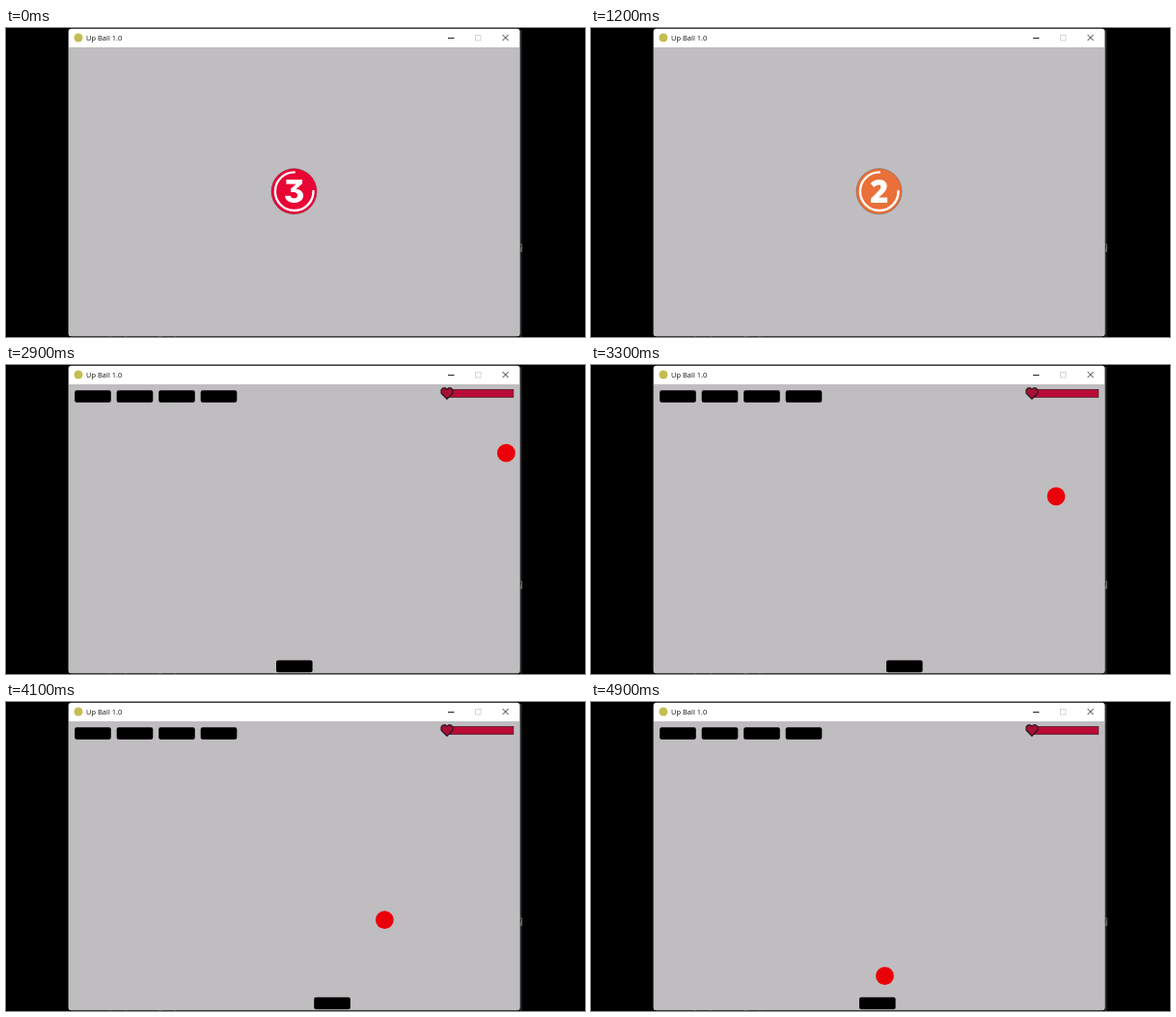
Write an HTML page that moves like this. It is 600 by 320 pixels and loops after 5000 ms.

```html
<!DOCTYPE html>
<html lang="en">
<head>
<meta charset="utf-8">
<title>Paddle game</title>
<style>
html, body { margin: 0; width: 100%; height: 100%; overflow: hidden; background: #000; }
svg { display: block; width: 600px; height: 320px; }
.title { font: 7.5px "Open Sans", sans-serif; fill: #111; }
.digit { font: 800 33px Inter, sans-serif; font-feature-settings: "cv01", "cv09"; text-anchor: middle; fill: #fff; }
.digit.wide { font-family: "Open Sans", sans-serif; }
</style>
</head>
<body>
<svg viewBox="0 0 600 320">
  <defs>
    <rect id="block" width="37.6" height="12.4" rx="2"/>
    <path id="heart" d="M457 35.2L451 29.3V25.8L453 23.8H455.4L457 25.4L458.6 23.8H461L463 25.8V29.3Z"/>
  </defs>
  <rect width="600" height="320"/>
  <path d="M533.5 2V320" stroke="#202427" stroke-width="2.5"/>
  <path d="M532.5 224h2v3M533 232l1.5-6v6" fill="none" stroke="#777" stroke-width=".8"/>
  <rect x="64.7" y=".7" width="467.8" height="318.6" rx="3" fill="#fff"/>
  <path d="M65 20H532V317Q532 319 530 319H67Q65 319 65 317Z" fill="#c0bdc0"/>
  <path d="M107 319.7h2M123 319.7h2M158 319.7h4M174 319.7h2" stroke="#777" stroke-width=".6"/>

  <circle cx="75" cy="10" r="4.5" fill="#c3bd52"/>
  <text class="title" x="83" y="13">Up Ball 1.0</text>
  <path d="M458 10.5H464.5" stroke="#222"/>
  <rect x="486.5" y="7.5" width="5.5" height="5.5" fill="none" stroke="#d2ced6" stroke-width=".9"/>
  <path d="M514.6 7L520.6 13M520.6 7L514.6 13" stroke="#222" stroke-width=".9"/>

  <g id="countdown">
    <circle id="badge" cx="298.5" cy="169.2" r="23.6" stroke="#3a3f50" stroke-opacity=".55" stroke-width=".6"/>
    <path d="M298.7 149.4A19.8 19.8 0 1 0 318.5 169" fill="none" stroke="#fff" stroke-width="2.4" stroke-linecap="round"/>
    <text id="digit" class="digit" x="298.7" y="181"></text>
  </g>

  <g id="game">
    <g id="lives"></g>
    <rect x="457" y="25.5" width="68.8" height="7.8" fill="#ba0c36" stroke="#51162a" stroke-width=".8"/>
    <use href="#heart" fill="#a80f35" stroke="#2b1820" stroke-width="1.2"/>
    <circle id="ball" r="9.4" fill="#ea0008"/>
    <use id="paddle" href="#block" y="305.8"/>
  </g>
</svg>
<script>
const $ = id => document.getElementById(id);
const LOOP = 5000, STEP = 100, GAME_START = 2900;
const counts = [
  { from: 0, digit: "3", color: "#e90534" },
  { from: 1000, digit: "2", color: "#e97038" },
  { from: 2000, digit: "1", color: "#453488" }
];
// [time, left edge]
const paddleKeys = [[2900, 280], [3200, 313], [3300, 306], [3400, 295], [3500, 295],
                    [3700, 316], [3800, 316], [4500, 323.5], [4900, 278]];
const RIGHT = 522.6, BOTTOM = 298.6;

$("lives").innerHTML = [0, 1, 2, 3]
  .map(i => `<use href="#block" x="${71.2 + i * 43.5}" y="26.3"/>`).join("");

function track(keys, t) {
  const i = Math.max(1, keys.findIndex(key => key[0] >= t));
  const [t0, a] = keys[i - 1], [t1, b] = keys[i];
  return a + (b - a) * (t - t0) / (t1 - t0);
}

const reflect = (value, limit) => limit - Math.abs(limit - value);

function ballPosition(t) {
  // The ball slows slightly near the paddle.
  const travel = (Math.min(t, 4500) - 3300) * 0.1121 + Math.max(0, t - 4500) * 0.1075;
  return [reflect(482 - travel, RIGHT), reflect(136 + travel, BOTTOM)];
}

function draw() {
  const t = Math.floor(performance.now() % LOOP / STEP) * STEP;
  const playing = t >= GAME_START;
  $("countdown").style.display = playing ? "none" : "";
  $("game").style.display = playing ? "" : "none";
  if (playing) {
    const [x, y] = ballPosition(t);
    $("ball").setAttribute("cx", x);
    $("ball").setAttribute("cy", y);
    $("paddle").setAttribute("x", track(paddleKeys, t));
  } else {
    const count = counts.findLast(c => t >= c.from);
    $("badge").setAttribute("fill", count.color);
    $("digit").textContent = count.digit;
    $("digit").classList.toggle("wide", count.digit === "2");
  }
  requestAnimationFrame(draw);
}
draw();
</script>
</body>
</html>
```
